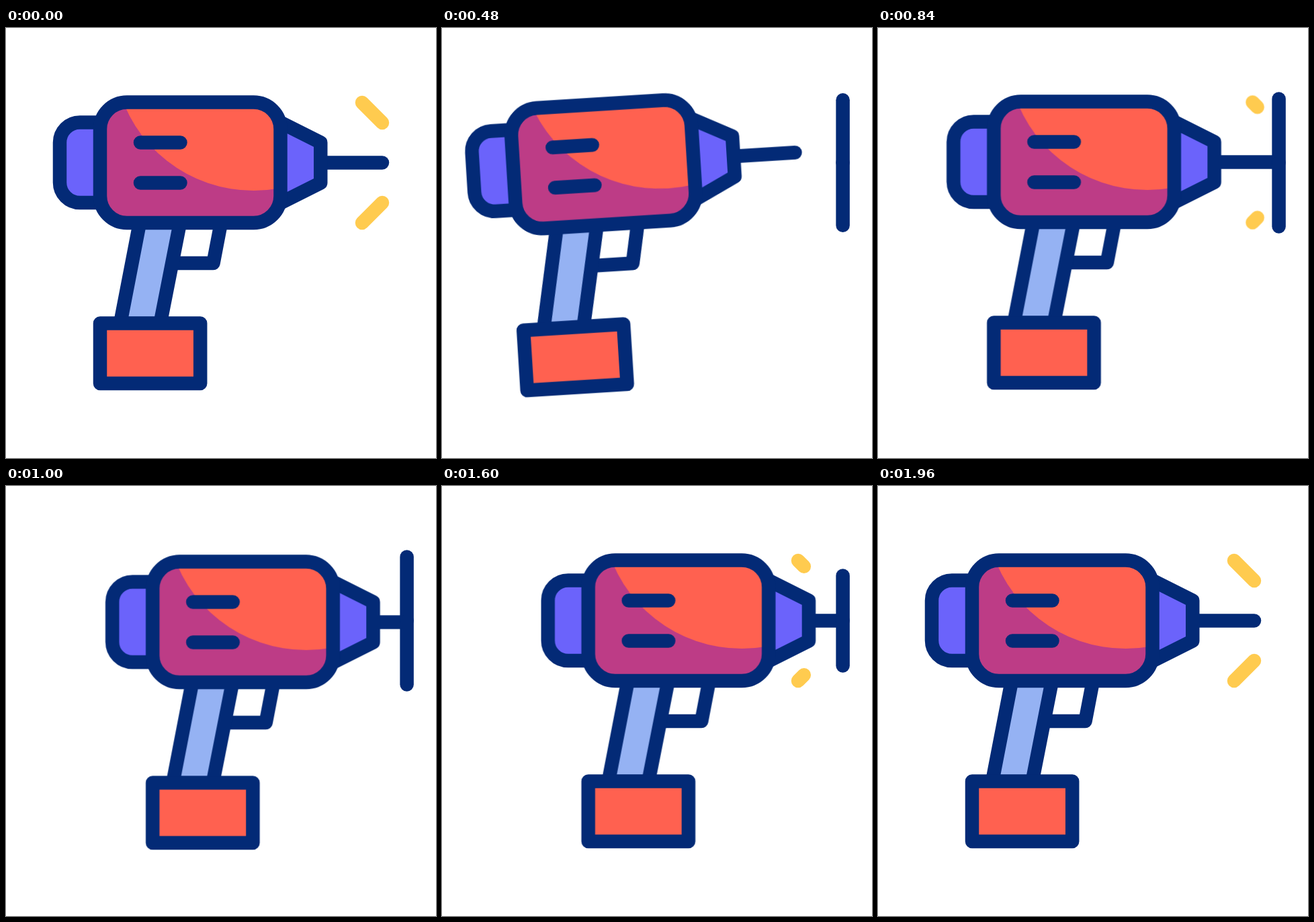
Animation, 640 px wide and 640 px high, one loop 2000 ms. Source, as an HTML page without scripts:

```html
<!DOCTYPE html>
<html lang="en">
<head>
<meta charset="utf-8">
<title>Power drill</title>
<style>
html, body { margin: 0; width: 100%; height: 100%; overflow: hidden; background: #fff; }
svg { display: block; width: 100%; height: 100%; }

.ink { fill: none; stroke: #032a76; stroke-width: 20.5; stroke-linecap: round; stroke-linejoin: round; }
.spark { stroke: #ffcb4f; }
.red { fill: #ff6150; }
.violet { fill: #6b63fb; }
.sky { fill: #95b2f3; }
.plum { fill: #bd3c86; }

.bob, .drill, .wall line, .sparks, .spark line {
  animation: 2s cubic-bezier(.3333, 0, .6667, 1) infinite;
}
.drill { transform-origin: 320px 320px; animation-name: drill; }
.bob { animation-name: bob; }
.wall { animation: wall-show 2s step-end infinite; }
.wall line { animation-name: wall; }
.sparks { transform-origin: 545px 200.5px; animation-name: sparks; }
.spark { animation: spark-show 2s step-end infinite; }
.spark line { animation-name: spark-start, spark-length; }

/* wind up, push into the wall, pull back */
@keyframes drill {
  0%, 2% { transform: translate(0, 0) rotate(0deg); }
  16.75% { transform: translate(-50px, 0) rotate(-6.7deg); }
  32% { transform: translate(0, 0) rotate(0deg); }
  60%, 70% { transform: translate(110px, 0) rotate(0deg); }
  98%, 100% { transform: translate(0, 0) rotate(0deg); }
}
@keyframes bob {
  0%, 2% { transform: translateY(0); }
  16.75% { transform: translateY(-.4px); }
  32% { transform: translateY(-.5px); }
  42% { transform: translateY(-1px); }
  52% { transform: translateY(2.5px); }
  58% { transform: translateY(1.5px); }
  60%, 100% { transform: translateY(0); }
}

/* both halves grow from the middle */
@keyframes wall {
  0%, 2% { stroke-dasharray: 0 200; }
  26%, 70% { stroke-dasharray: 95 200; }
  98%, 100% { stroke-dasharray: 0 200; }
}
@keyframes wall-show {
  0% { opacity: 0; }
  2.1% { opacity: 1; }
  97.9%, 100% { opacity: 0; }
}

@keyframes sparks {
  0%, 2% { transform: translate(0, 0) rotate(0deg); }
  16% { transform: translate(-22.9px, -37px) rotate(-9.95deg); }
  31%, 45% { transform: translate(27.5px, -.5px) rotate(0deg); }
  69%, 100% { transform: translate(0, 0) rotate(0deg); }
}
@keyframes spark-start {
  0%, 16% { stroke-dashoffset: 0; }
  31%, 31.5% { stroke-dashoffset: -30; }
  41%, 100% { stroke-dashoffset: 0; }
}
@keyframes spark-length {
  0%, 2% { stroke-dasharray: 30 99; }
  16%, 31.5% { stroke-dasharray: 0 99; }
  35% { stroke-dasharray: 9.2 99; }
  38% { stroke-dasharray: 15.8 99; }
  41% { stroke-dasharray: 9.2 99; }
  44.5%, 70% { stroke-dasharray: 0 99; }
  98%, 100% { stroke-dasharray: 30 99; }
}
@keyframes spark-show {
  0% { opacity: 1; }
  15.9% { opacity: 0; }
  31.5% { opacity: 1; }
  44.4% { opacity: 0; }
  70.1%, 100% { opacity: 1; }
}
</style>
</head>
<body>
<svg viewBox="0 0 640 640">
  <clipPath id="front"><path d="M-60-60H597V700H-60Z"/></clipPath>

  <g class="sparks">
    <g class="ink spark">
      <line x1="530" y1="111" x2="560" y2="141" pathLength="30"/>
      <line x1="530" y1="290" x2="560" y2="260" pathLength="30"/>
    </g>
  </g>

  <g clip-path="url(#front)">
    <g class="bob">
      <g class="drill ink">
        <path class="violet" d="M140 140.5H110a30 30 0 0 0-30 30V230a30 30 0 0 0 30 30H140"/>
        <path d="M468 200.5H560"/>
        <path class="violet" d="M408.5 140.5l59.75 30v60l-59.75 30"/>
        <path d="M320 290L308.5 350H247"/>
        <path class="sky" d="M199 290L170 440H229.5L259 290"/>
        <path class="red" d="M140 439.5H289.2V529H140Z"/>
        <rect class="plum" x="140" y="110.5" width="268.5" height="179.5" rx="40" stroke="none"/>
        <path class="red" stroke="none" d="M176.4 115A208 208 0 0 0 404 238.9V150.5A35.5 35.5 0 0 0 368.5 115Z"/>
        <rect x="140" y="110.5" width="268.5" height="179.5" rx="40"/>
        <path d="M200 170.5h59.5M200 230.5h59.5"/>
      </g>
    </g>
  </g>

  <g class="wall ink">
    <line x1="596.6" y1="200.5" x2="596.6" y2="105.5"/>
    <line x1="596.6" y1="200.5" x2="596.6" y2="295.5"/>
  </g>
</svg>
</body>
</html>
```
